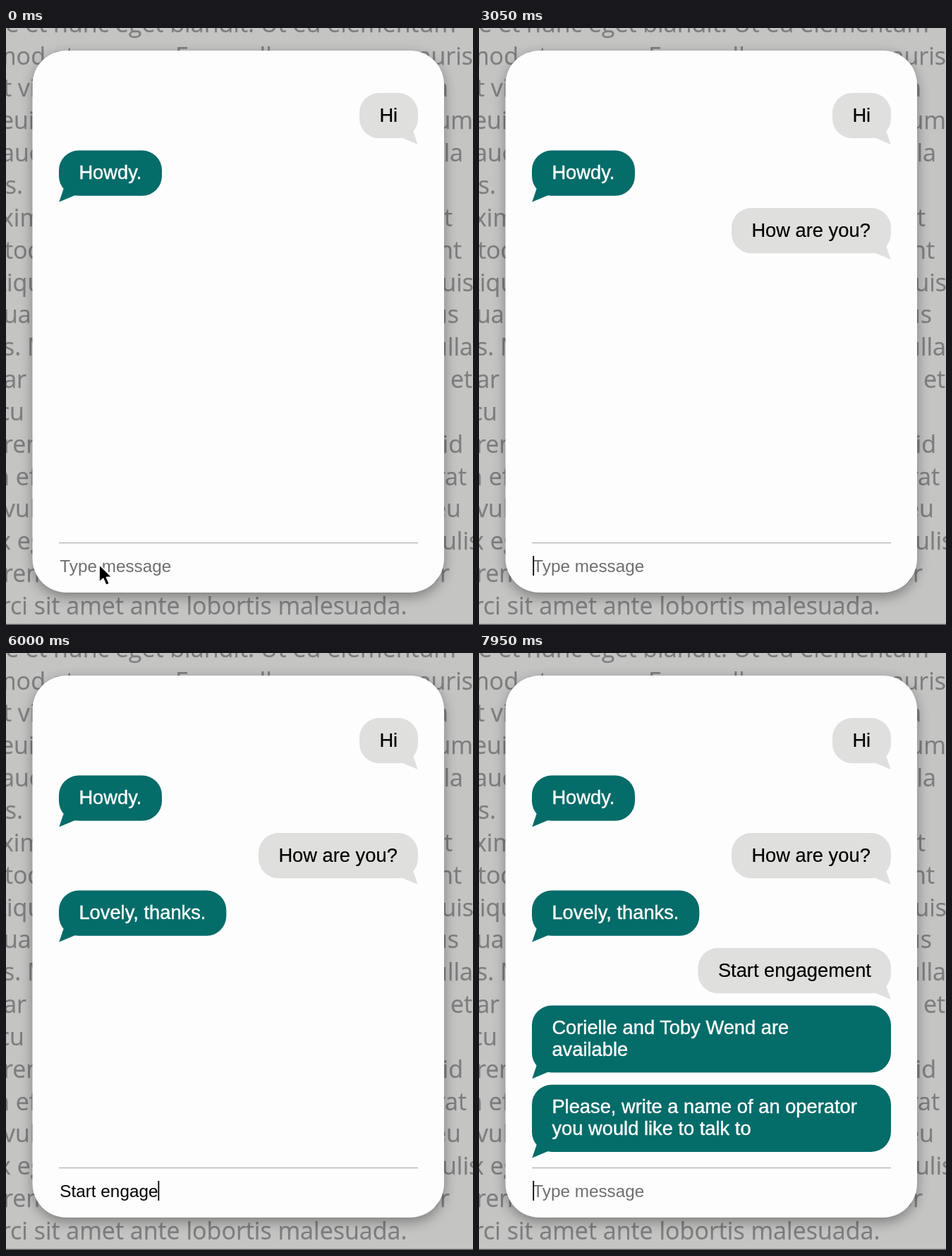
An HTML page for the animation above (8 s loop, 662 by 846 pixels).

```html
<!DOCTYPE html>
<html lang="en">
<head>
<meta charset="utf-8">
<title>Chat window</title>
<style>
  html, body { margin: 0; width: 100%; height: 100%; overflow: hidden; background: #c4c4c3; }
  svg { display: block; width: 662px; height: 846px; }
  text { white-space: pre; }
  .page text { font: 34px "Open Sans", sans-serif; fill: #7e7e7f; stroke: #7e7e7f; stroke-width: .25; }
  .bubble text { font: 27.3px "Liberation Sans", Arial, sans-serif; stroke-width: .45; }
  .bot { fill: #046c69; }
  .bot text { fill: #fdfdfe; stroke: #fdfdfe; }
  .user { fill: #dfdfdd; }
  .user text { fill: #000; stroke: #000; stroke-width: .2; }
  #field { font: 24.3px "Liberation Sans", Arial, sans-serif; }
</style>
</head>
<body>
<svg viewBox="0 0 662 846">
  <defs>
    <filter id="blur" x="-20%" y="-20%" width="140%" height="140%">
      <feGaussianBlur stdDeviation="9"/>
    </filter>
  </defs>
  <rect width="662" height="846" fill="#c4c4c3"/>
  <g id="page" class="page"></g>
  <rect y="844.6" width="662" height="1.4" fill="#555"/>
  <rect x="38" y="38" width="583" height="768" rx="48" fill="#000" opacity=".36" filter="url(#blur)"/>
  <rect x="37.5" y="32" width="583.5" height="768" rx="48" fill="#fdfdfe"/>
  <g id="chat"></g>
  <rect x="75" y="728.8" width="509" height="1.6" fill="#bdbdbd"/>
  <text id="field" x="76.3" y="771"></text>
  <rect id="caret" y="748" width="1.8" height="28" fill="#000"/>
  <path id="pointer" d="M132 760v25.5l5.8-5.2 4 9.4 4.8-2-4-9.2h8z"
        fill="#000" stroke="#fff" stroke-width="1.8" stroke-linejoin="round"/>
</svg>
<script>
const LOOP = 8000, LEFT = 75, RIGHT = 584, FIELD_X = 76.3, FOCUS = 500;
const PLACEHOLDER = "Type message";
const $ = id => document.getElementById(id);

function add(parent, tag, attrs, text) {
  const node = document.createElementNS("http://www.w3.org/2000/svg", tag);
  for (const key in attrs) node.setAttribute(key, attrs[key]);
  if (text) node.textContent = text;
  parent.appendChild(node);
  return node;
}

// Page copy behind the card: row, x, text, and whether x is the right end.
const copy = [
  [0, 638, "vitae et nunc eget blandit. Ut eu elementum", 1],
  [1, 56, "euismod", 1], [1, 66, "at augue."], [1, 240, "Fusce ullamcorper"], [1, 662, "mauris", 1],
  [2, -4, "t vitae"], [2, 627, "urna", 1],
  [3, -8, "euismod"], [3, 662, "interdum", 1],
  [4, -7, "auctor"], [4, 648, "nulla", 1],
  [5, 24, "lacus.", 1],
  [6, -7, "ximus"], [6, 633, "erat", 1],
  [7, -2, "todo"], [7, 646, "tincidunt", 1],
  [8, -11, "tique"], [8, 663, "quis", 1],
  [9, -4, "uam"], [9, 642, "lectus", 1],
  [10, -4, "s. Morbi"], [10, 662, "nulla", 1],
  [11, 29, "pulvinar", 1], [11, 661, "et", 1],
  [12, 26, "arcu", 1],
  [13, -4, "rem"], [13, 648, "id", 1],
  [14, -16, "n efficitur"], [14, 653, "erat", 1],
  [15, -4, "vulputate"], [15, 645, "eu", 1],
  [16, -11, "x eget"], [16, 618, "ulis"],
  [17, -4, "rem"], [17, 629, "tempor", 1],
  [18, 568.5, "orci sit amet ante lobortis malesuada.", 1]
];
for (const [row, x, text, fromEnd] of copy)
  add($("page"), "text", { x, y: 5.7 + row * 45.85, "text-anchor": fromEnd ? "end" : "start" }, text);

// Start time, sender, bubble width, lines.
const messages = [
  [0, "user", 83, "Hi"],
  [0, "bot", 146, "Howdy."],
  [2850, "user", 226, "How are you?"],
  [3200, "bot", 237.3, "Lovely, thanks."],
  [7700, "user", 273.5, "Start engagement"],
  [7850, "bot", 509, "Corielle and Toby Wend are", "available"],
  [7850, "bot", 509, "Please, write a name of an operator", "you would like to talk to"]
];
let nextTop = 92;
const bubbles = messages.map(([at, who, width, ...lines]) => {
  const height = 33.5 + 30.8 * lines.length;
  const x = who === "bot" ? LEFT : RIGHT - width;
  const node = add($("chat"), "g", { class: "bubble " + who, transform: `translate(${x} ${nextTop})` });
  add(node, "rect", { width, height, rx: 28 });
  add(node, "path", {
    d: `M.3 ${height + 8.7}L7 ${height - 11}L24 ${height - 6}L23 ${height - .8}Z`,
    transform: who === "bot" ? "" : `translate(${width} 0) scale(-1 1)`
  });
  lines.forEach((line, i) => add(node, "text", { x: 28.4, y: 40.5 + 31 * i }, line));
  nextTop += height + 17.2;
  return { at, node };
});

const typing = [
  { text: "How are you?", from: 850, step: 120, sent: 2850 },
  { text: "Start engagement", from: 4150, step: 160, sent: 7700 }
];

function draw(time) {
  for (const { at, node } of bubbles) node.style.display = time >= at ? "" : "none";

  let value = "", blinkFrom = FOCUS;
  for (const { text, from, step, sent } of typing) {
    if (time >= sent) blinkFrom = sent;
    else if (time >= from) {
      const count = Math.min(text.length, 1 + Math.floor((time - from) / step));
      value = text.slice(0, count);
      blinkFrom = from + (count - 1) * step;
    }
  }
  const field = $("field");
  field.textContent = value || PLACEHOLDER;
  field.setAttribute("fill", value ? "#000" : "#6f6f6f");
  $("caret").setAttribute("x", FIELD_X + (value ? field.getComputedTextLength() : 0));
  const lit = time >= FOCUS && (time - blinkFrom) % 1000 < 500;
  $("caret").style.display = lit ? "" : "none";
  $("pointer").style.display = time < typing[0].from ? "" : "none";
}

const start = performance.now();
function tick(now) {
  draw(Math.max(0, now - start) % LOOP);
  requestAnimationFrame(tick);
}
draw(0);
requestAnimationFrame(tick);
</script>
</body>
</html>
```
